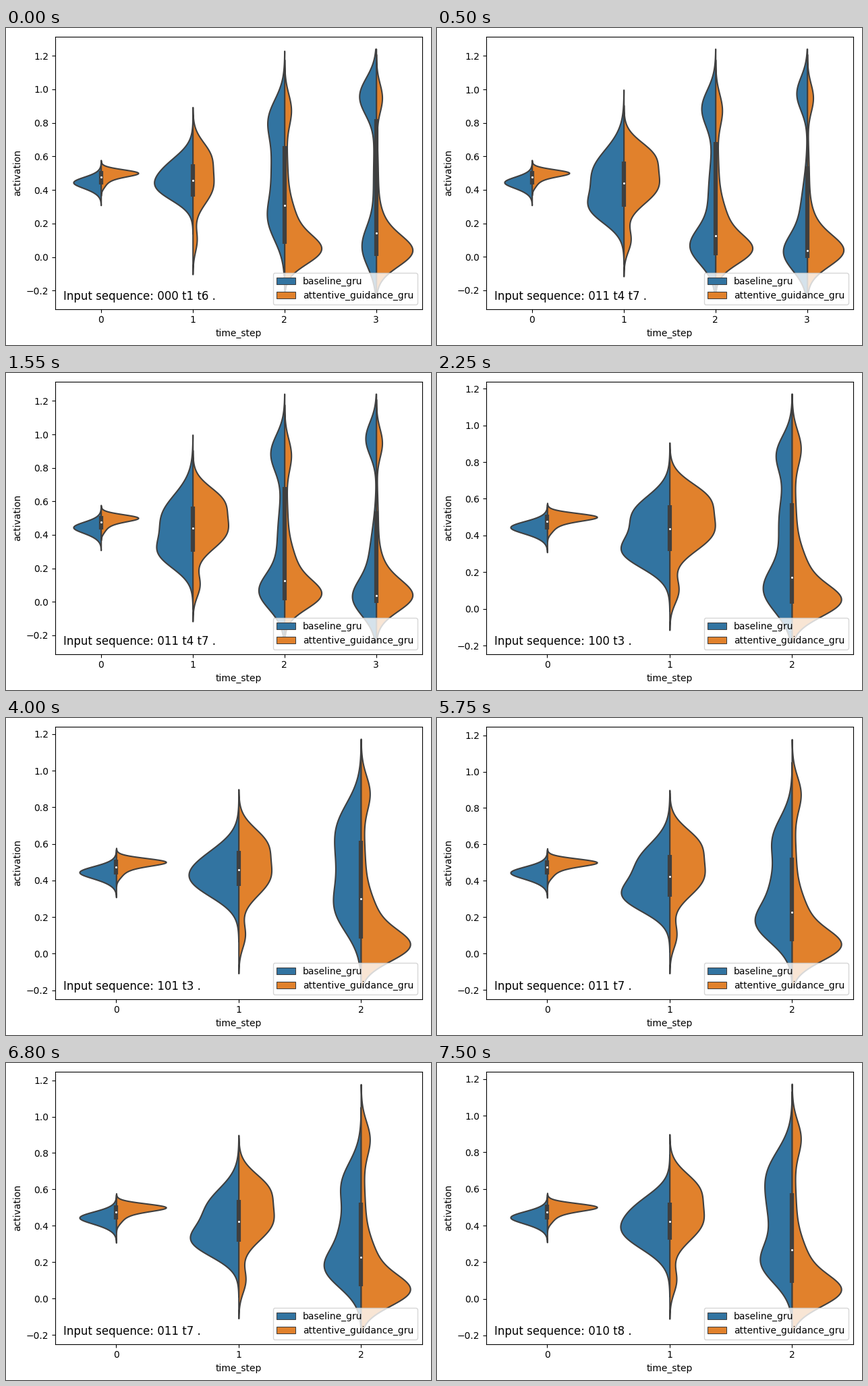
Recreate the animation shown at these times as a matplotlib script. Size 630 by 470 pixels, loop 8000 ms.

```python
import numpy as np
import matplotlib.pyplot as plt
from matplotlib.animation import FuncAnimation
from matplotlib.patches import Patch

WIDTH, HEIGHT, DPI = 630, 470, 100
LEFT, RIGHT, TOP, BOTTOM = 72.7, 616.7, 12.6, 416.6
BLUE, ORANGE, GRAY = "#3274a1", "#e1812c", "#3f3f3f"
LINE = 1.5
HALF_WIDTH = 0.4
THINNEST = 0.0015
STEP_MS, LOOP_MS = 250, 8000

# A density is a sum of normal bumps (mean, spread, height); height 1 fills a half violin.
BASELINE_START = [(.447, .028, .42), (.465, .034, .2), (.415, .034, .24)]
ATTENTIVE_START = [(.503, .02, .83), (.475, .03, .28), (.42, .02, .05)]
ATTENTIVE_MIDDLE = [(.61, .085, .68), (.42, .105, .91), (.1, .07, .19)]
ATTENTIVE_LATE = [(.04, .085, .88), (.2, .12, .28), (.5, .2, .08), (.88, .095, .17)]
ATTENTIVE_LAST = [(.03, .09, .88), (.16, .11, .2), (.45, .2, .05), (.95, .085, .16)]
START_QUARTILES = (.433, .475, .513)


def scaled(bumps, factor):
    return [(mean, spread, factor * height) for mean, spread, height in bumps]


def scene(start, sequence, limits, middle, *late):
    """Collect (left bumps, right bumps, quartiles) for each time step."""
    baseline, attentive_height, quartiles = middle
    violins = [(BASELINE_START, ATTENTIVE_START, START_QUARTILES),
               (baseline, scaled(ATTENTIVE_MIDDLE, attentive_height), quartiles)]
    for (bumps, quartiles), attentive in zip(late, [ATTENTIVE_LATE, ATTENTIVE_LAST]):
        violins.append((bumps, attentive, quartiles))
    return start, sequence, limits, violins


SCENES = [
    scene(0, "000 t1 t6 .", (-.3101, 1.315),
          ([(.52, .09, .68), (.4, .075, .68)], .58, (.36, .457, .553)),
          ([(.83, .12, .38), (.53, .17, .33), (.22, .13, .4)], (.079, .308, .662)),
          ([(.96, .11, .44), (.06, .12, .36), (.45, .3, .08)], (.006, .143, .823))),
    scene(500, "011 t4 t7 .", (-.3118, 1.3159),
          ([(.5, .14, .85), (.28, .09, .68)], .98, (.3, .441, .57)),
          ([(.89, .11, .36), (.06, .105, .6), (.35, .25, .2)], (.01, .127, .687)),
          ([(.975, .1, .29), (.02, .105, .53), (.22, .2, .2)], (-.006, .038, .542))),
    scene(2250, "100 t3 .", (-.246, 1.2393),
          ([(.52, .1, .72), (.31, .09, .9)], .94, (.316, .4375, .566)),
          ([(.85, .1, .28), (.47, .2, .27), (.1, .12, .54)], (.029, .173, .577))),
    scene(4000, "101 t3 .", (-.2477, 1.2414),
          ([(.5, .1, .61), (.38, .09, .63)], .68, (.3715, .46, .563)),
          ([(.7, .14, .42), (.47, .14, .32), (.235, .13, .46)], (.084, .3015, .6185))),
    scene(5750, "011 t7 .", (-.2499, 1.2481),
          ([(.5, .11, .63), (.31, .085, .82)], .73, (.313, .4245, .543)),
          ([(.62, .13, .4), (.38, .1, .28), (.17, .11, .72)], (.0686, .228, .528))),
    scene(7500, "010 t8 .", (-.2469, 1.2417),
          ([(.52, .08, .38), (.37, .1, .92)], .71, (.324, .423, .5265)),
          ([(.7, .13, .4), (.46, .15, .4), (.19, .11, .56)], (.086, .2686, .578))),
]

fig = plt.figure(figsize=(WIDTH / DPI, HEIGHT / DPI), dpi=DPI, facecolor="white")
ax = fig.add_axes([LEFT / WIDTH, 1 - BOTTOM / HEIGHT,
                   (RIGHT - LEFT) / WIDTH, (BOTTOM - TOP) / HEIGHT])
caption = fig.text(0.135, 0.142, "", fontsize=12)


def draw_half(center, side, bumps, values, color):
    density = sum(height * np.exp(-((values - mean) / spread) ** 2 / 2)
                  for mean, spread, height in bumps)
    visible = density > THINNEST
    ax.fill_betweenx(values[visible], center + side * HALF_WIDTH * density[visible],
                     center, facecolor=color, edgecolor=GRAY, linewidth=LINE)


def draw_violin(center, baseline, attentive, quartiles, values):
    draw_half(center, -1, baseline, values, BLUE)
    draw_half(center, 1, attentive, values, ORANGE)
    low, median, high = quartiles
    ax.plot([center, center], [low, high], color=GRAY, linewidth=3 * LINE,
            solid_capstyle="butt")
    ax.plot([center], [median], "o", ms=2.2, color="white", mew=0, zorder=3)


def draw(frame):
    now = frame * STEP_MS
    _, sequence, (low, high), violins = [s for s in SCENES if s[0] <= now][-1]
    margin = (high - low) / 22
    values = np.linspace(low + margin, high - margin, 600)

    ax.clear()
    for step, violin in enumerate(violins):
        draw_violin(step, *violin, values)
    ax.set_xlim(-0.5, len(violins) - 0.5)
    ax.set_ylim(low, high)
    ax.set_xticks(range(len(violins)))
    ax.set_yticks(np.arange(-1, 7) / 5)
    ax.set_xlabel("time_step")
    ax.set_ylabel("activation")
    ax.legend(handles=[
        Patch(facecolor=color, edgecolor=GRAY, linewidth=LINE / 2, label=label)
        for color, label in [(BLUE, "baseline_gru"), (ORANGE, "attentive_guidance_gru")]
    ], loc="lower right")
    caption.set_text("Input sequence: " + sequence)
    return []


anim = FuncAnimation(fig, draw, frames=LOOP_MS // STEP_MS, interval=STEP_MS,
                     init_func=lambda: draw(0), repeat=True, repeat_delay=0)
plt.show()
```
